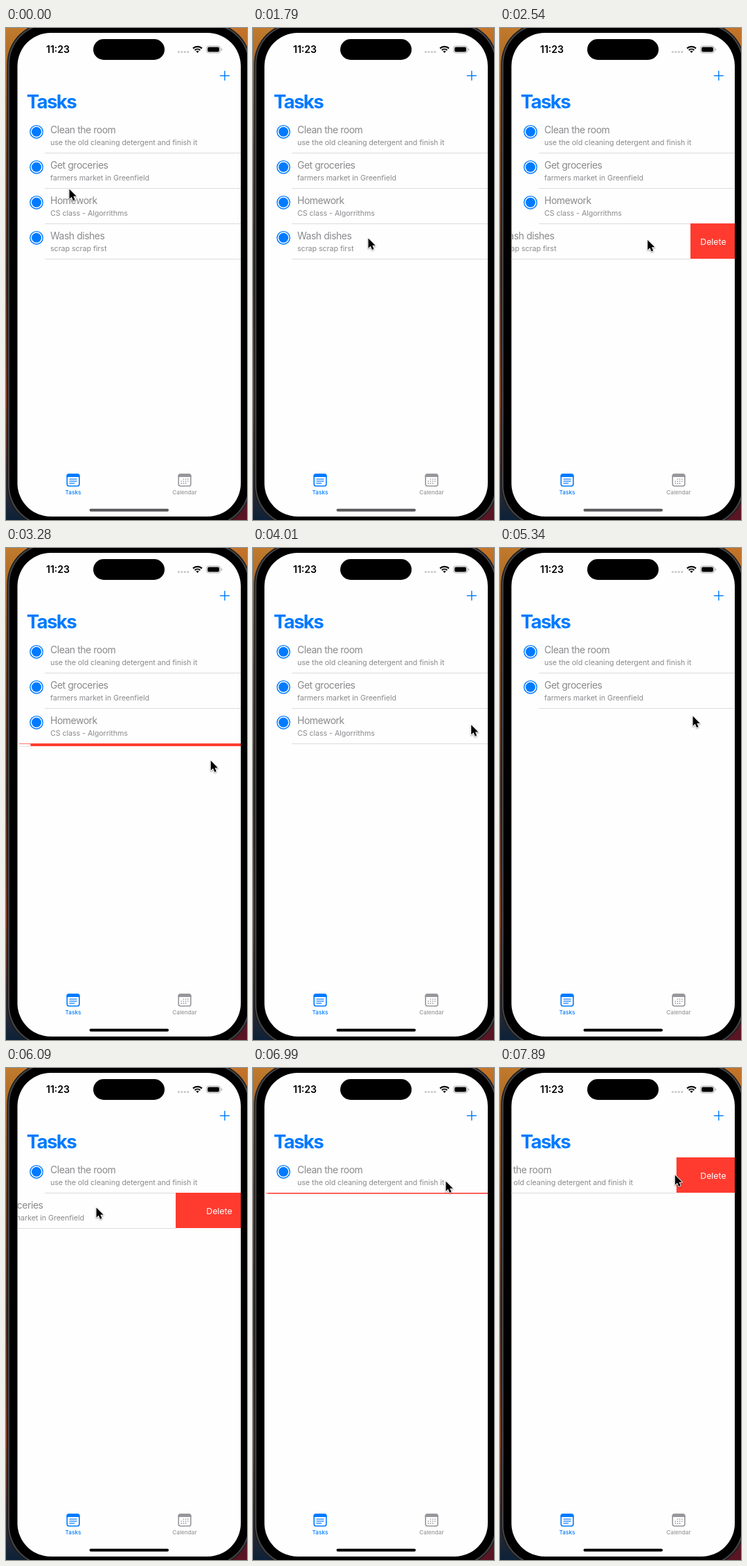
Animation of 348 by 710 pixels, one loop 8 s. Source, as an HTML page with a canvas:

```html
<!DOCTYPE html>
<html lang="en">
<head>
<meta charset="utf-8">
<title>Tasks</title>
<style>
html, body { margin: 0; width: 100%; height: 100%; overflow: hidden; background: #000; }
canvas { display: block; width: 348px; height: 710px; }
</style>
</head>
<body>
<canvas id="stage"></canvas>
<script>
const W = 348, H = 710, LOOP = 8000, TICK = 148.5;
const BLUE = '#007aff', RED = '#ff3b30', GRAY = '#8a8a8e', TAB_GRAY = '#97979b';
const LEFT = 16, RIGHT = 339, TOP = 129, ROW = 51;
const BUTTON = 64, PULL = 94, DELETE_X = 295;
const canvas = document.getElementById('stage');
const ctx = canvas.getContext('2d');
const dpr = window.devicePixelRatio || 1;
canvas.width = W * dpr;
canvas.height = H * dpr;

// swipe and tap are ticks; x, y is where the swipe begins
const tasks = [
  { title: 'Clean the room', note: 'use the old cleaning detergent and finish it', swipe: 51.4, tap: 55, x: 336.5, y: 154 },
  { title: 'Get groceries', note: 'farmers market in Greenfield', swipe: 39, tap: 43.6, x: 224, y: 201 },
  { title: 'Homework', note: 'CS class - Algorrithms', swipe: 28, tap: 32.1, x: 316, y: 251 },
  { title: 'Wash dishes', note: 'scrap scrap first', swipe: 12, tap: 19.1, x: 166, y: 303 }
];
const firstTap = Math.min(...tasks.map(t => t.tap));

// Each swipe pulls left, returns to the button, taps it and rests
const gesture = ({ swipe, tap, x, y }) => [
  [swipe, x, y], [swipe + 2, x - PULL, y], [tap, DELETE_X, y + 4], [tap + 2.5, DELETE_X, y + 4]
];
const wander = [[0, 91, 232], [2, -4, 185], [4, -4, 185], [6, 208, 300], [8, 166, 303], [47, 278, 163]];
const path = [...wander, ...tasks.flatMap(gesture)].sort((a, b) => a[0] - b[0]);

// Eased value of one column of a key list
function along(keys, tick, column = 1) {
  const next = keys.findIndex(k => k[0] > tick);
  if (next === 0) return keys[0][column];
  if (next < 0) return keys[keys.length - 1][column];
  const a = keys[next - 1], b = keys[next];
  const u = (tick - a[0]) / (b[0] - a[0]);
  return a[column] + (b[column] - a[column]) * u * u * (3 - 2 * u);
}

function box(x, y, w, h, r, fill) {
  ctx.beginPath();
  ctx.roundRect(x, y, w, h, r);
  ctx.fillStyle = fill;
  ctx.fill();
}

function frame(x, y, w, h, r, width, color) {
  ctx.beginPath();
  ctx.roundRect(x, y, w, h, r);
  ctx.lineWidth = width;
  ctx.strokeStyle = color;
  ctx.stroke();
}

function disc(x, y, r, fill) {
  ctx.beginPath();
  ctx.arc(x, y, r, 0, Math.PI * 2);
  ctx.fillStyle = fill;
  ctx.fill();
}

function arc(x, y, r, from, to, width, color) {
  ctx.beginPath();
  ctx.arc(x, y, r, from, to);
  ctx.lineWidth = width;
  ctx.strokeStyle = color;
  ctx.stroke();
}

function line(x1, y1, x2, y2, width, color) {
  ctx.beginPath();
  ctx.moveTo(x1, y1);
  ctx.lineTo(x2, y2);
  ctx.lineWidth = width;
  ctx.strokeStyle = color;
  ctx.stroke();
}

function text(str, x, y, size, color, weight = 400, spacing = 0, align = 'left') {
  ctx.font = `${weight} ${size}px Inter, Roboto, sans-serif`;
  ctx.letterSpacing = spacing + 'px';
  ctx.textAlign = align;
  ctx.fillStyle = color;
  ctx.fillText(str, x, y);
}

function wallpaper(x, colors) {
  const g = ctx.createLinearGradient(0, 0, 0, H);
  colors.forEach((c, i) => g.addColorStop(i / (colors.length - 1), c));
  ctx.fillStyle = g;
  ctx.fillRect(x, 0, W / 2, H);
}

function drawPhone() {
  wallpaper(0, ['#c07a2c', '#7a4420', '#4a3024', '#8a3c20', '#0c2238']);
  wallpaper(W / 2, ['#c47428', '#6a3420', '#40201c', '#5a1424']);
  box(1.5, -8, 352, 728, 60, '#1c1c1e');
  box(3, -6.5, 349, 725, 58.5, '#454446');
  box(5, -4.5, 345, 721, 56.5, '#000');
  box(LEFT + 0.5, 7, RIGHT - LEFT - 0.5, 698, 48, '#fefefe');
}

function drawStatus() {
  text('11:23', 75, 36, 14, '#000', 600, 0, 'center');
  box(126, 16, 103, 30, 15, '#000');
  for (let i = 0; i < 4; i++) disc(249.3 + i * 4.5, 34.5, 1.6, '#c8c8ca');

  const from = -Math.PI / 2 - 0.77, to = -Math.PI / 2 + 0.77;
  for (const r of [9.2, 5.5]) arc(276.5, 36, r, from, to, 2.2, '#000');
  arc(276.5, 36, 1.5, from, to, 3, '#000');

  frame(289.5, 26, 20, 10, 3.2, 0.9, '#a4a4a6');
  box(291, 27.5, 17, 7, 2, '#000');
  box(310.8, 29.3, 1.2, 3.5, 0.6, '#a4a4a6');
}

function drawHeader() {
  line(308.8, 68.8, 322.8, 68.8, 1.4, BLUE);
  line(315.8, 61.8, 315.8, 75.8, 1.4, BLUE);
  text('Tasks', 29.7, 116.3, 27.6, BLUE, 700, -1.6);
}

function drawTab(x, label, color) {
  frame(x - 8.8, 644, 17.6, 17, 2.8, 1.6, color);
  box(x - 9.5, 643.2, 19, 4.8, [3, 3, 0, 0], color);
  text(label, x, 673.2, 8.1, color, 500, 0.05, 'center');
}

function drawTabs(dimmed) {
  drawTab(97, 'Tasks', BLUE);
  for (let i = 0; i < 3; i++) line(91.5, 651 + i * 3, i < 2 ? 102.5 : 99, 651 + i * 3, 1.2, BLUE);
  drawTab(258, 'Calendar', TAB_GRAY);
  for (let i = 1; i < 11; i++) {
    disc(253.2 + (i % 4) * 3.2, 651 + Math.floor(i / 4) * 3.1, 0.85, TAB_GRAY);
  }
  box(120.5, 693.7, 114.5, 4, 2, dimmed ? '#5a5a5c' : '#000');
}

function drawTask(task, index, tick) {
  const { swipe, tap } = task;
  const u = Math.max(0, (tick - tap) / 4);
  if (u > 0.95) return;
  const gone = 1 - (1 - u) ** 2;
  const drag = along([[swipe, 0], [swipe + 2, PULL], [swipe + 3, BUTTON]], tick);
  const open = drag + (RIGHT - LEFT - drag) * gone;
  const y = TOP + ROW * index, h = ROW * (1 - gone), edge = RIGHT - open;

  ctx.save();
  ctx.beginPath();
  ctx.rect(LEFT + 0.5, y, RIGHT - LEFT - 0.5, h + 1);
  ctx.clip();
  ctx.translate(-open, 0);
  disc(44, y + 20.8, 7, BLUE);
  arc(44, y + 20.8, 9.2, 0, Math.PI * 2, 1.4, BLUE);
  text(task.title, 64, y + 23.1, 13.9, GRAY, 400, -0.42);
  text(task.note, 64, y + 39.9, 10.7, GRAY, 400, -0.06);
  ctx.fillStyle = '#dcdcde';
  ctx.fillRect(56, y + h, RIGHT - 56, 1);
  ctx.translate(open, 0);

  if (open > 0) {
    ctx.fillStyle = RED;
    ctx.fillRect(edge, y, open, h);
    text('Delete', RIGHT - Math.min(open, BUTTON) + 14.3, y + 30.5, 12.3, '#fff');
  }
  if (gone) {
    ctx.fillRect(edge, y, open, 1);
    line(LEFT + 3, y + 0.5, edge, y + 0.5, 1, '#ff766e');
    ctx.fillStyle = RED;
    ctx.fillRect(edge, y, open, Math.max(h, 1.5));
  }
  ctx.restore();
}

function drawPointer(x, y) {
  const shape = [[0, 0], [0, 14.2], [3.2, 11.2], [5.5, 16.4], [8, 15.3], [5.8, 10.3], [10.2, 10.3]];
  ctx.save();
  ctx.translate(x + 0.5, y + 0.5);
  ctx.beginPath();
  shape.forEach(([px, py]) => ctx.lineTo(px, py));
  ctx.closePath();
  ctx.lineJoin = 'round';
  ctx.lineWidth = 1.8;
  ctx.strokeStyle = '#fff';
  ctx.shadowColor = 'rgba(0,0,0,.4)';
  ctx.shadowBlur = 2 * dpr;
  ctx.shadowOffsetY = dpr;
  ctx.stroke();
  ctx.shadowColor = 'transparent';
  ctx.fillStyle = '#000';
  ctx.fill();
  ctx.restore();
}

function draw(ms) {
  const tick = Math.floor((ms % LOOP + 12) / TICK);
  ctx.setTransform(dpr, 0, 0, dpr, 0, 0);
  drawPhone();
  drawStatus();
  drawHeader();
  tasks.forEach((task, i) => drawTask(task, i, tick));
  drawTabs(tick < firstTap);
  drawPointer(along(path, tick), along(path, tick, 2));
}

let start;
function loop(now) {
  start ??= now;
  draw(now - start);
  requestAnimationFrame(loop);
}
draw(0);
requestAnimationFrame(loop);
</script>
</body>
</html>
```
